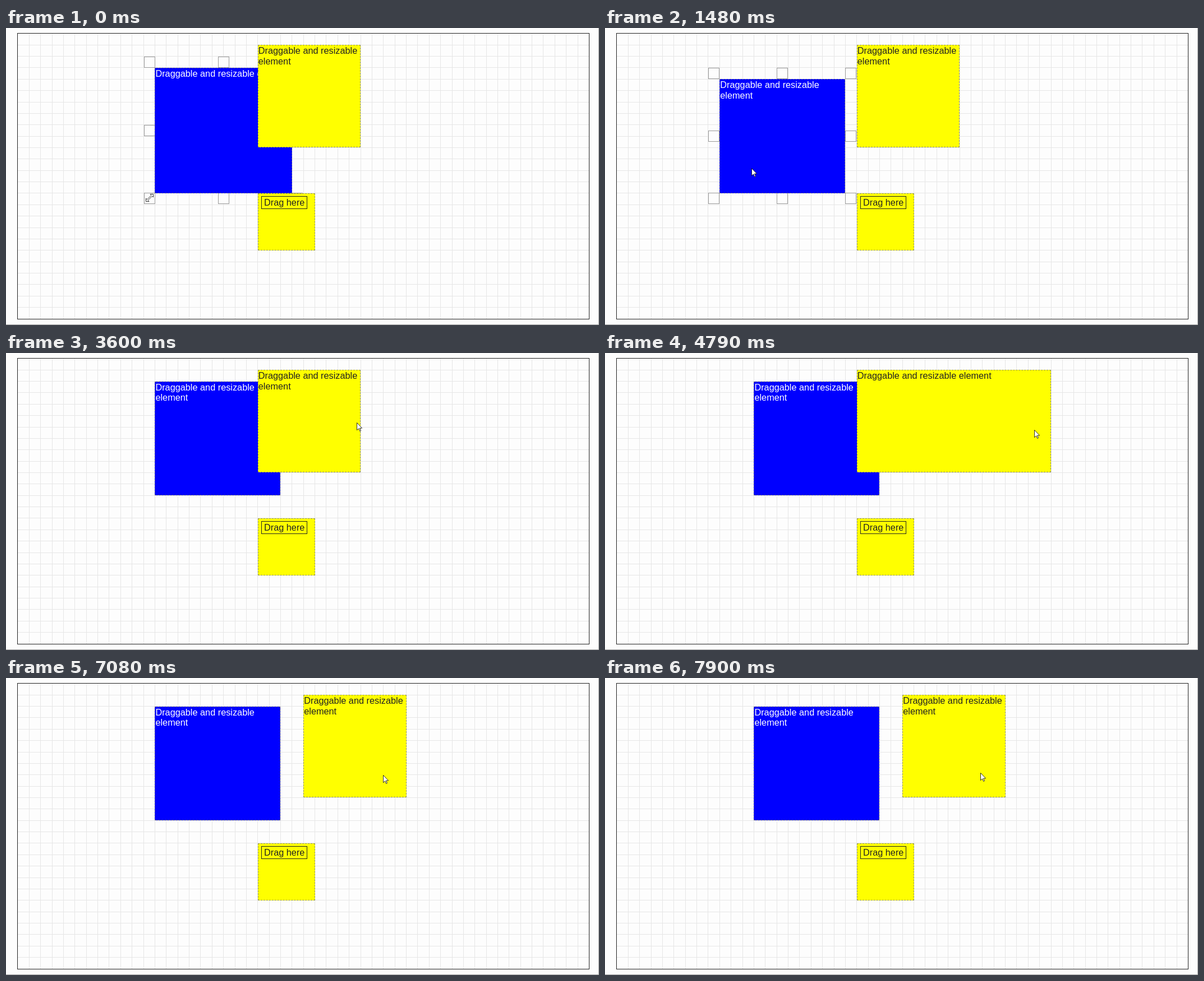
An HTML page that plays this animation: 1057 px wide and 530 px high, repeating every 8000 ms.

```html
<!DOCTYPE html>
<html lang="en">
<head>
<meta charset="utf-8">
<title>Drag and resize on a grid</title>
<style>
html, body { margin: 0; width: 100%; height: 100%; overflow: hidden; background: #fdfdfd; }
#stage { position: relative; width: 1057px; height: 530px; overflow: hidden; font: 16.3px/18.4px "Liberation Sans", Arial, sans-serif; }
#stage > * { position: absolute; box-sizing: border-box; }
svg { left: 0; top: 0; overflow: visible; }
.box { border: 1px dashed rgba(112, 112, 112, .75); background: #ff0; color: #222; }
#blue { background: #00f; color: #fff; }
.handle { width: 20px; height: 20px; border: 1px solid #999; background: #fdfdfd; }
#label { left: 455px; top: 300px; width: 82px; height: 23px; border: 1px solid #222; padding: 1px 0 0 4px; white-space: nowrap; color: #222; }
</style>
</head>
<body>
<div id="stage">
  <svg width="1057" height="530" shape-rendering="crispEdges" fill="none">
    <path id="grid" stroke="#e6e6e6"/>
    <rect x="20.5" y="9.5" width="1019" height="510" stroke="#222"/>
    <path d="M1056.5 0V530M0 529.5H1057" stroke="#a0a0a0"/>
  </svg>
  <div id="blue" class="box">Draggable and resizable element</div>
  <div id="small" class="box"></div>
  <div id="label">Drag here</div>
  <div id="yellow" class="box">Draggable and resizable element</div>
  <svg width="1057" height="530" fill="#fff" stroke="#000" stroke-width=".8">
    <path id="arrow" d="M.5 .5V13.7L3.6 10.8 5.6 15.4 7.5 14.6 5.5 10.1H9.6Z"/>
    <path id="sizer" d="M6.5-6.5H1L3-4.5-4.5 3-6.5 1V6.5H-1L-3 4.5 4.5-3 6.5-1Z"/>
  </svg>
</div>
<script>
const LOOP = 8000, TICKS = 60;
const CELL = 20.37, LEFT = 20.97, TOP = 9.78;
const el = id => document.getElementById(id);
const stage = el('stage'), blue = el('blue'), yellow = el('yellow');
const arrow = el('arrow'), sizer = el('sizer');
const snap = (d, cells = 1) => Math.round(d / (CELL * cells));

// Turning points of the pointer: tick, x, y
const path = [
  [0, 256, 303], [4, 282, 278], [6, 318, 232], [7, 267, 243], [9, 222, 284],
  [13, 300, 215], [14, 314, 216], [15, 371, 148], [17, 371, 148], [20, 647, 130],
  [23, 577, 112], [27, 625, 124], [30, 630, 122], [35, 765, 137], [39, 787, 137],
  [42, 669, 138], [44, 669, 138], [47, 563, 153], [53, 672, 173], [54, 690, 180],
  [55, 693, 221], [57, 677, 186], [59, 669, 169]
];

function pointer(tick) {
  const next = Math.max(1, path.findIndex(p => p[0] >= tick));
  const [t0, x0, y0] = path[next - 1], [t1, x1, y1] = path[next];
  const k = (tick - t0) / (t1 - t0);
  return [x0 + (x1 - x0) * k, y0 + (y1 - y0) * k];
}

function move(node, x, y) {
  node.style.left = x + 'px';
  node.style.top = y + 'px';
}

function place(node, col, row, cols, rows) {
  const x = LEFT + CELL * col, y = TOP + CELL * row;
  const w = CELL * cols, h = CELL * rows;
  move(node, x, y);
  node.style.width = w + 'px';
  node.style.height = h + 'px';
  return [x, y, w, h];
}

function drawGrid() {
  let d = '';
  for (let i = 1; i < 50; i++) d += `M${Math.floor(LEFT + CELL * i) + .5} 10V519`;
  for (let i = 1; i < 25; i++) d += `M21 ${Math.floor(TOP + CELL * i) + .5}H1039`;
  el('grid').setAttribute('d', d);
}

const handles = [];
for (const i of [0, 1, 2]) for (const j of [0, 1, 2]) {
  if (i === 1 && j === 1) continue;
  const node = document.createElement('div');
  node.className = 'handle';
  stage.insertBefore(node, blue);
  handles.push({ node, i, j });
}

// Handle positions along one side: before, middle, after
const around = (start, size) =>
  [Math.round(start - 19.9), Math.round(start + size / 2 - 10), Math.floor(start + size)];

function drawBlue(tick) {
  const shrink = snap(pointer(Math.min(tick, 4))[0] - 256);
  let col = 12 + shrink, row = 3;
  if (tick >= 6) {
    const [px, py] = pointer(Math.min(tick, 14));
    col += snap(px - 341);
    row += snap(py - 230);
  }
  const [x, y, w, h] = place(blue, col, row, 12 - shrink, 11 - shrink);
  const xs = around(x, w), ys = around(y, h);
  for (const { node, i, j } of handles) {
    node.style.display = tick < 22 ? '' : 'none';
    move(node, xs[i], ys[j]);
  }
}

// The yellow box snaps to every fourth cell
function drawYellow(tick, px, py) {
  const sizing = tick > 30 && tick < 43, dragging = tick > 47;
  const grow = sizing ? 4 * snap(px - 630, 4) : 0;
  const dx = dragging ? 4 * snap(px - 553, 4) : 0;
  const dy = dragging ? 4 * snap(py - 144, 4) : 0;
  place(yellow, 21 + dx, 1 + dy, 9 + grow, 9);
}

function draw(tick) {
  const [px, py] = pointer(tick);
  drawBlue(tick);
  drawYellow(tick, px, py);
  const sizing = tick < 4;
  arrow.style.display = sizing ? 'none' : '';
  sizer.style.display = sizing ? '' : 'none';
  (sizing ? sizer : arrow).setAttribute('transform', `translate(${Math.round(px)} ${Math.round(py)})`);
}

const began = performance.now();
function run() {
  draw(Math.floor((performance.now() - began) % LOOP / LOOP * TICKS));
  requestAnimationFrame(run);
}
drawGrid();
place(el('small'), 21, 14, 5, 5);
draw(0);
requestAnimationFrame(run);
</script>
</body>
</html>
```
